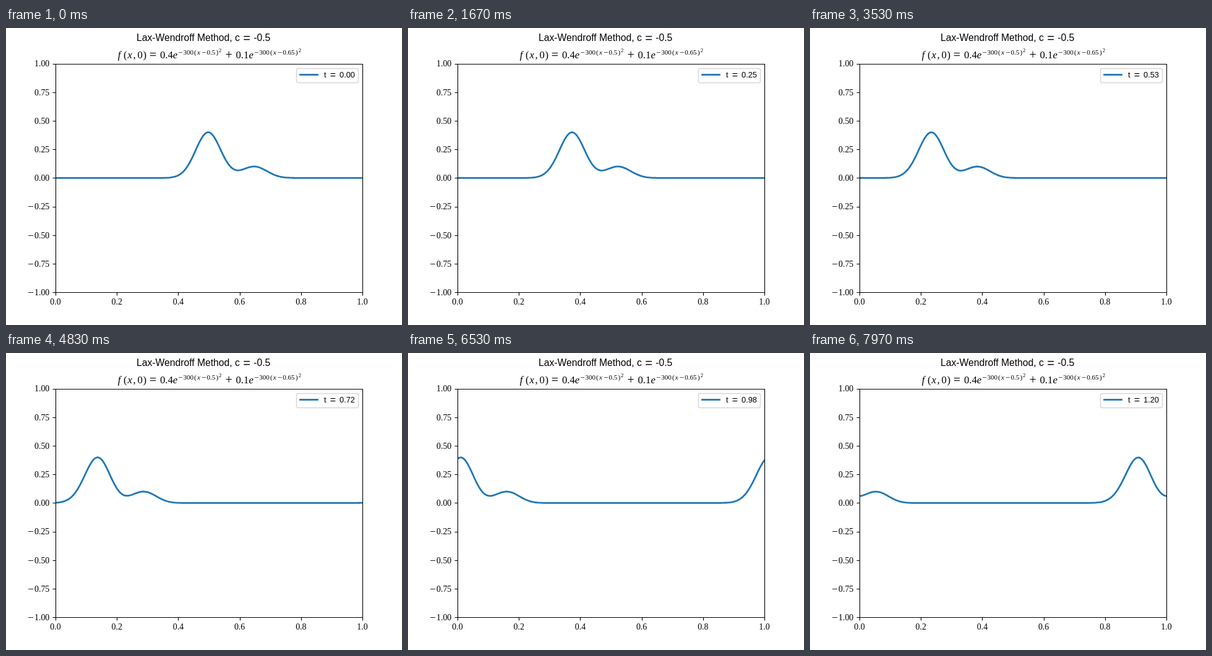
Recreate the animation shown at these times as an HTML page. Size 640x480 px, loop 8.01 s.

```html
<!DOCTYPE html>
<html lang="en">
<head>
<meta charset="utf-8">
<title>Lax-Wendroff Method</title>
<style>
  html, body { margin: 0; width: 100%; height: 100%; overflow: hidden; background: #fff; }
  svg { display: block; width: 640px; height: 480px; }
  .sans { font-family: "Liberation Sans", Arial, sans-serif; }
  .serif { font-family: "Liberation Serif", Times, serif; }
  .axis { fill: none; stroke: #000; stroke-width: 1.11; }
  .wave { fill: none; stroke: #1f77b4; stroke-width: 2.78; stroke-linejoin: round; stroke-linecap: square; }
  .tick { font-size: 13.89px; }
</style>
</head>
<body>
<svg viewBox="0 0 640 480">
  <clipPath id="plot"><rect x="80" y="57.6" width="496" height="369.6"/></clipPath>
  <path id="curve" class="wave" clip-path="url(#plot)"/>
  <path class="axis" d="M80.5 58.5H576.5V427.5H80.5Z" stroke-linecap="square"/>
  <path id="ticks" class="axis"/>
  <g id="labels" class="serif tick"></g>
  <text class="sans" x="211" y="21.2" font-size="15.7">Lax-Wendroff Method, <tspan x="370" word-spacing="1">c <tspan font-size="20" dy="2">=</tspan><tspan dy="-2"> -0.5</tspan></tspan></text>
  <text id="formula" class="serif"></text>
  <rect x="469.5" y="65.5" width="100" height="23" rx="2.8" fill="#fff" fill-opacity=".8" stroke="#ccc" stroke-opacity=".8" stroke-width="1.39"/>
  <path class="wave" d="M475.5 75.5H503.5"/>
  <text class="sans" x="514" y="80" font-size="12.8" word-spacing="2.5">t <tspan font-size="16" dy="1.3">=</tspan><tspan dy="-1.3"> </tspan><tspan id="clock">0.00</tspan></text>
</svg>
<script>
const NS = "http://www.w3.org/2000/svg";
const byId = id => document.getElementById(id);

function add(parent, tag, attrs, text) {
  const el = document.createElementNS(NS, tag);
  for (const key in attrs) el.setAttribute(key, attrs[key]);
  el.textContent = text;
  return parent.appendChild(el);
}

const px = x => 80 + 496 * x;
const py = y => 242.4 - 184.8 * y;
const snap = v => Math.floor(v + 0.5) + 0.5;

function drawTicks() {
  const labels = byId("labels");
  let d = "";
  for (let i = 0; i <= 5; i++) {
    const x = px(i / 5);
    d += `M${snap(x)} 427.5v5`;
    add(labels, "text", { x, y: 447, "text-anchor": "middle" }, (i / 5).toFixed(1));
  }
  for (let i = -4; i <= 4; i++) {
    const y = py(i / 4);
    d += `M80.5 ${snap(y)}h-5`;
    const label = add(labels, "text", { x: 70.3, y: y + 4.8, "text-anchor": "end" }, "");
    if (i < 0) add(label, "tspan", { "font-size": 17, dy: 1 }, "\u2212");
    add(label, "tspan", i < 0 ? { dx: 1.2, dy: -1 } : {}, Math.abs(i / 4).toFixed(2));
  }
  byId("ticks").setAttribute("d", d);
}

function drawFormula() {
  const put = (text, x, y = 49, size = 16.67) =>
    add(byId("formula"), "tspan", {
      x, y, "font-size": size, "font-style": /[fxe]/.test(text) ? "italic" : "normal"
    }, text);

  // exponent of the form -300(x-a)^2, starting at x0
  function exponent(x0, center) {
    const small = (text, dx) => put(text, x0 + dx, 43.4, 11.1);
    const minus = dx => put("\u2212", x0 + dx, 44, 13);
    const end = center.length > 3 ? 52.9 : 47;
    minus(0.9);
    small("300", 9);
    small("(", 26.7);
    small("x", 31.6);
    minus(38.6);
    small(center, 47);
    small(")", 15 + end);
    put("2", x0 + 19.6 + end, 39.2, 8.6);
  }

  put("f", 180.8);
  put("(", 190);
  put("x", 196.6);
  put(",", 205.6);
  put("0", 212.6);
  put(")", 221.6);
  put("=", 231.8, 50, 20);
  put("0.4", 249);
  put("e", 269.8);
  exponent(277.4, "0.5");
  put("+", 354.4, 50, 20);
  put("0.1", 371.4);
  put("e", 392.4);
  exponent(400.2, "0.65");
}

const FRAMES = 240, LOOP = 8010;
const N = 201, DX = 0.005, DT = 0.005, SPEED = -0.5;
const C = SPEED * DT / DX;

// one Lax-Wendroff step on a periodic grid
function step(u) {
  return u.map((v, i) => {
    const left = u[(i + N - 1) % N], right = u[(i + 1) % N];
    return v - C / 2 * (right - left) + C * C / 2 * (right - 2 * v + left);
  });
}

function solve() {
  const bump = (x, a, c) => a * Math.exp(-300 * (x - c) ** 2);
  let u = Array.from({ length: N }, (_, i) => bump(i * DX, 0.4, 0.5) + bump(i * DX, 0.1, 0.65));
  return Array.from({ length: FRAMES }, () => {
    u = step(u);
    return "M" + u.map((v, i) => px(i * DX).toFixed(2) + " " + py(v).toFixed(3)).join("L");
  });
}

drawTicks();
drawFormula();
const paths = solve();
const start = performance.now();
let shown = -1;

function render(now) {
  // 30 frames a second, rounded to hundredths of a second
  const ms = Math.floor(Math.max(0, now - start) % LOOP / 10) * 10;
  const k = Math.min(FRAMES - 1, Math.floor((ms + 5) * 3 / 100));
  if (k !== shown) {
    shown = k;
    byId("curve").setAttribute("d", paths[k]);
    byId("clock").textContent = (k / 200).toFixed(2);
  }
  requestAnimationFrame(render);
}
render(start);
</script>
</body>
</html>
```
